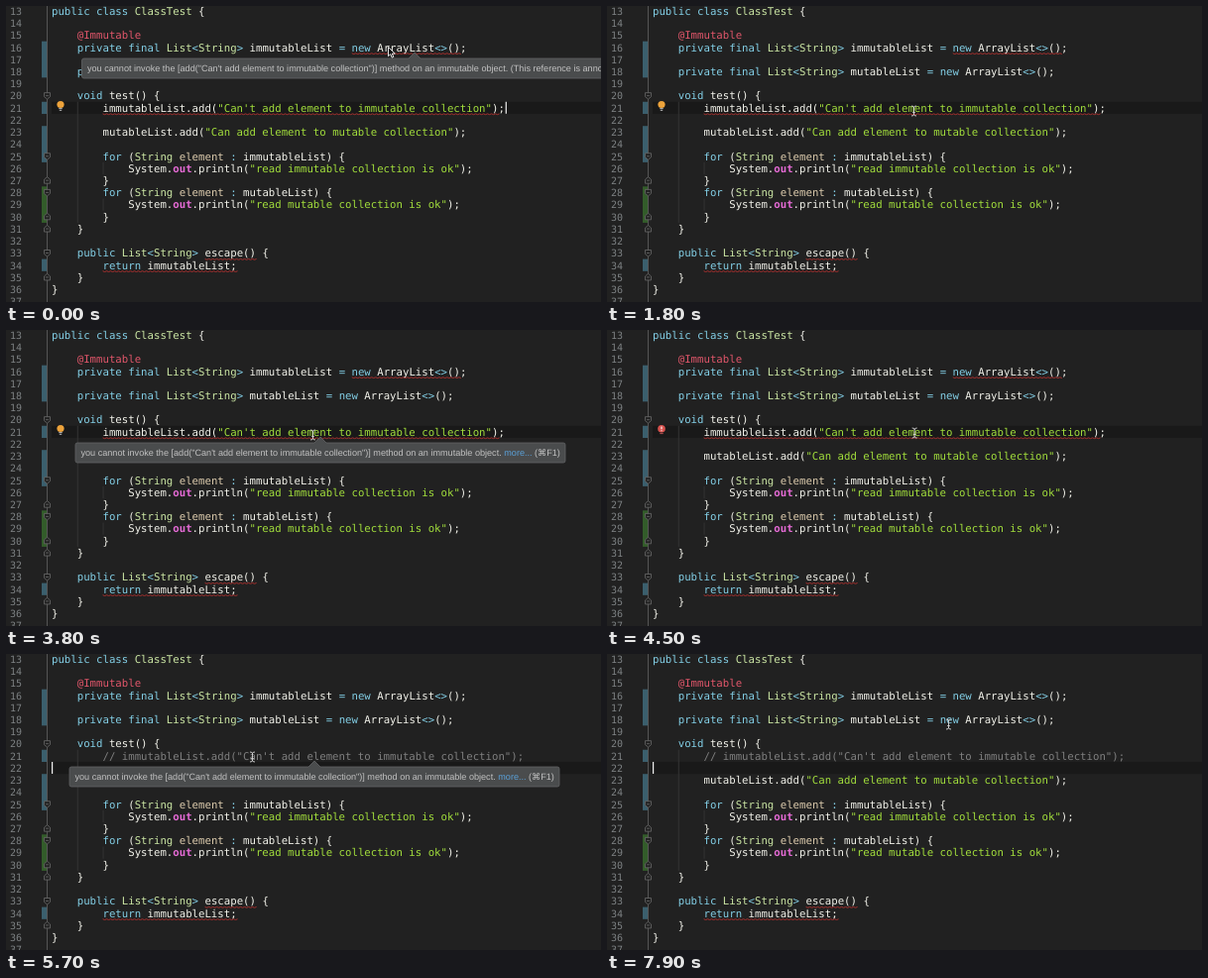
An HTML page that plays this animation: 600 by 299 pixels, repeating every 8000 ms.

```html
<!DOCTYPE html>
<html>
<head>
<meta charset="utf-8">
<style>
html, body { margin: 0; width: 100%; height: 100%; overflow: hidden; background: #212121; }
svg { display: block; width: 600px; height: 299px; }
text { white-space: pre; text-rendering: geometricPrecision; }
.code { font: 10.7px "DejaVu Sans Mono", monospace; fill: #f2f2ea; }
.num { font: 10px "DejaVu Sans Mono", monospace; fill: #7d8183; }
.tip { font: 9.1px "Liberation Sans", Arial, sans-serif; fill: #c2c2c2; }
.key { fill: #83cfe6; }
.type { fill: #cbe6a4; }
.str { fill: #a2de3c; }
.note { fill: #e0566a; }
.arg { fill: #dccbad; }
.out { fill: #e66bd6; font-weight: bold; }
.rem { fill: #7f7f7f; }
.link { fill: #5aa0d8; }
</style>
</head>
<body>
<svg id="stage" viewBox="0 0 600 299"></svg>
<script>
const LOOP = 8000, ROW = 12.22, CHAR = 6.442, LEFT = 46, FIRST = 13, COMMENT_AT = 5400;
const CALL = `immutableList.add("Can't add element to immutable collection");`;
const MESSAGE = `you cannot invoke the [add("Can't add element to immutable collection")] method on an immutable object. `;
const SOURCE = `public class ClassTest {

    @Immutable
    private final List<String> immutableList = new ArrayList<>();

    private final List<String> mutableList = new ArrayList<>();

    void test() {


        mutableList.add("Can add element to mutable collection");

        for (String element : immutableList) {
            System.out.println("read immutable collection is ok");
        }
        for (String element : mutableList) {
            System.out.println("read mutable collection is ok");
        }
    }

    public List<String> escape() {
        return immutableList;
    }
}`.split("\n");

const escapeText = s => s.replace(/&/g, "&amp;").replace(/</g, "&lt;");
const span = (cls, s) => `<tspan class="${cls}">${escapeText(s)}</tspan>`;
const baseline = line => 8.9 + (line - FIRST) * ROW;
const rowTop = line => baseline(line) - 9.9;
const column = n => LEFT + n * CHAR;

const TOKENS = /("[^"]*")|(@\w+)|(\b(?:public|class|private|final|new|void|for|return)\b|[<>:=]+)|(\bout\b)|(\belement\b)|(\b(?:ClassTest|List|String)\b)|\w+|[^"@\w<>:=]+/g;
const CLASSES = ["str", "note", "key", "out", "arg", "type"];
function paint(code) {
  return code.replace(TOKENS, (all, ...groups) => {
    const i = groups.slice(0, CLASSES.length).findIndex(Boolean);
    return i < 0 ? escapeText(all) : span(CLASSES[i], all);
  });
}
const codeLine = (line, body) => `<text class="code" x="${LEFT}" y="${baseline(line)}">${body}</text>`;

function underline(line, from, count) {
  const y = baseline(line) + 2.2;
  let d = `M${column(from)} ${y}`;
  for (let i = 0; i < count * CHAR / 2; i++) d += `l2 ${i % 2 ? -0.8 : 0.8}`;
  return `<path d="${d}" fill="none" stroke="#b5322f" stroke-width=".9"/>`;
}
const bar = (line, rows, color) =>
  `<rect x="36" y="${rowTop(line)}" width="5.5" height="${rows * ROW}" fill="${color}"/>`;
const guide = (x, from, to, color) =>
  `<path d="M${x} ${rowTop(from)}V${rowTop(to + 1)}" stroke="${color}"/>`;
function fold(line, dir) {
  const y = baseline(line) - 3.8;
  return `<path d="M38.5 ${y - 3 * dir}h6v${4 * dir}l-3 ${2.5 * dir}l-3 ${-2.5 * dir}zM40 ${y}h3" fill="#212121" stroke="#6a6a6a" stroke-width=".8"/>`;
}
function tooltip(id, x, y, width, peak, tail) {
  return `<g id="${id}"><path d="M${x + 2} ${y}H${peak - 6}l6 -6l6 6H${x + width - 2}q2 0 2 2v16q0 2 -2 2H${x + 2}q-2 0 -2 -2v-16q0 -2 2 -2z" fill="#4a4c4d" stroke="#626465" stroke-width=".8"/>
    <text class="tip" x="${x + 5.5}" y="${y + 12.5}">${escapeText(MESSAGE)}${tail}</text></g>`;
}

const more = span("link", "more...") + " (⌘F1)";
const lines = SOURCE.map((code, i) => codeLine(FIRST + i, paint(code))).join("");
const numbers = Array.from({ length: 25 }, (_, i) =>
  `<text class="num" x="4" y="${baseline(FIRST + i)}">${FIRST + i}</text>`).join("");
const pad = " ".repeat(8);

document.getElementById("stage").innerHTML = `
  <rect width="600" height="299" fill="#212121"/>
  <rect id="row" width="554" height="${ROW}" fill="#191919"/>
  ${guide(column(4) + .5, 21, 30, "#343434")}${[26, 29].map(n => guide(column(8) + .5, n, n, "#343434")).join("")}
  ${[16, 23].map(n => bar(n, 3, "#3b5f6d")).join("")}${[21, 34].map(n => bar(n, 1, "#3b5f6d")).join("")}${bar(28, 3, "#335c2a")}
  ${guide(41.5, 13, 37, "#555")}
  ${[20, 25, 28, 33].map(n => fold(n, 1)).join("")}${[27, 30, 31, 35].map(n => fold(n, -1)).join("")}
  ${numbers}${lines}
  ${underline(33, 24, 8)}${underline(34, 8, 21)}
  <g id="active">${codeLine(21, pad + paint(CALL))}${underline(16, 47, 17)}${underline(21, 8, 62)}</g>
  <g id="commented">${codeLine(21, span("rem", pad + "// " + CALL))}</g>
  <g id="bulb"><circle cx="55" cy="99.5" r="3.6" fill="#eda33b"/><path d="M53.3 103.6h3.4M53.8 105.3h2.4" stroke="#b9b9b9"/></g>
  <g id="alert"><circle cx="55" cy="99.8" r="3.8" fill="#d9534f"/><path d="M55 97.5v2.8M55 101.2v1" stroke="#fff" stroke-width="1.1"/><path d="M53.3 104.6h3.4" stroke="#b05050"/></g>
  <rect id="caret" width="1.2" height="12" fill="#f0f0f0"/>
  ${tooltip("tip1", 76.5, 53, 560, 412, "(This reference is annotated")}
  ${tooltip("tip2", 70, 114, 494, 317, more)}
  ${tooltip("tip3", 64, 114, 494, 311, more)}
  <path id="arrow" d="M385.5 41.5v9.2l2.2 -2l1.5 3.4l1.6 -.7l-1.5 -3.3h3z" fill="#111" stroke="#fff" stroke-width=".9"/>
  <path id="beam" d="M-2.5 -5Q0 -5 0 -3.5Q0 -5 2.5 -5M0 -4V4M-2.5 5Q0 5 0 3.5Q0 5 2.5 5M-1.3 1.5H1.3" fill="none" stroke="#d8d8d8" stroke-width=".9"/>`;

const el = id => document.getElementById(id);
const show = (id, on) => el(id).setAttribute("visibility", on ? "visible" : "hidden");
const place = (id, x, y) => { el(id).setAttribute("x", x); el(id).setAttribute("y", y); };

// Pointer stops: time, x, y
const PATH = [[0, 387, 46], [1150, 387, 46], [1700, 309.5, 106], [3800, 309.5, 106], [4200, 310, 104],
  [5400, 311, 104], [5700, 248.5, 104], [5850, 248.5, 104], [6300, 391, 43.5], [6800, 391, 43.5], [7400, 344.5, 71], [LOOP, 344.5, 71]];
function pointer(t) {
  const i = PATH.findIndex(p => p[0] > t);
  const [t0, x0, y0] = PATH[i - 1], [t1, x1, y1] = PATH[i];
  const u = (t - t0) / (t1 - t0), k = u * u * (3 - 2 * u);
  return [x0 + (x1 - x0) * k, y0 + (y1 - y0) * k];
}

function draw(now) {
  const t = now % LOOP, done = t >= COMMENT_AT, line = done ? 22 : 21;
  const blink = done ? t < 6000 || t % 1000 >= 500 : t % 1000 < 500;
  place("row", LEFT, rowTop(line));
  place("caret", done ? LEFT : column(71) + .3, rowTop(line));
  show("caret", blink);
  show("active", !done);
  show("commented", done);
  show("bulb", t < 4200);
  show("alert", t >= 4200 && !done);
  show("tip1", t < 1300);
  show("tip2", t >= 2300 && t < 3900);
  show("tip3", t >= 5000 && t < 6000);
  show("arrow", t < 1150);
  show("beam", t >= 1150);
  el("beam").setAttribute("transform", `translate(${pointer(t)})`);
}
const start = performance.now();
function tick() {
  draw(Math.max(0, performance.now() - start));
  requestAnimationFrame(tick);
}
tick();
</script>
</body>
</html>
```
